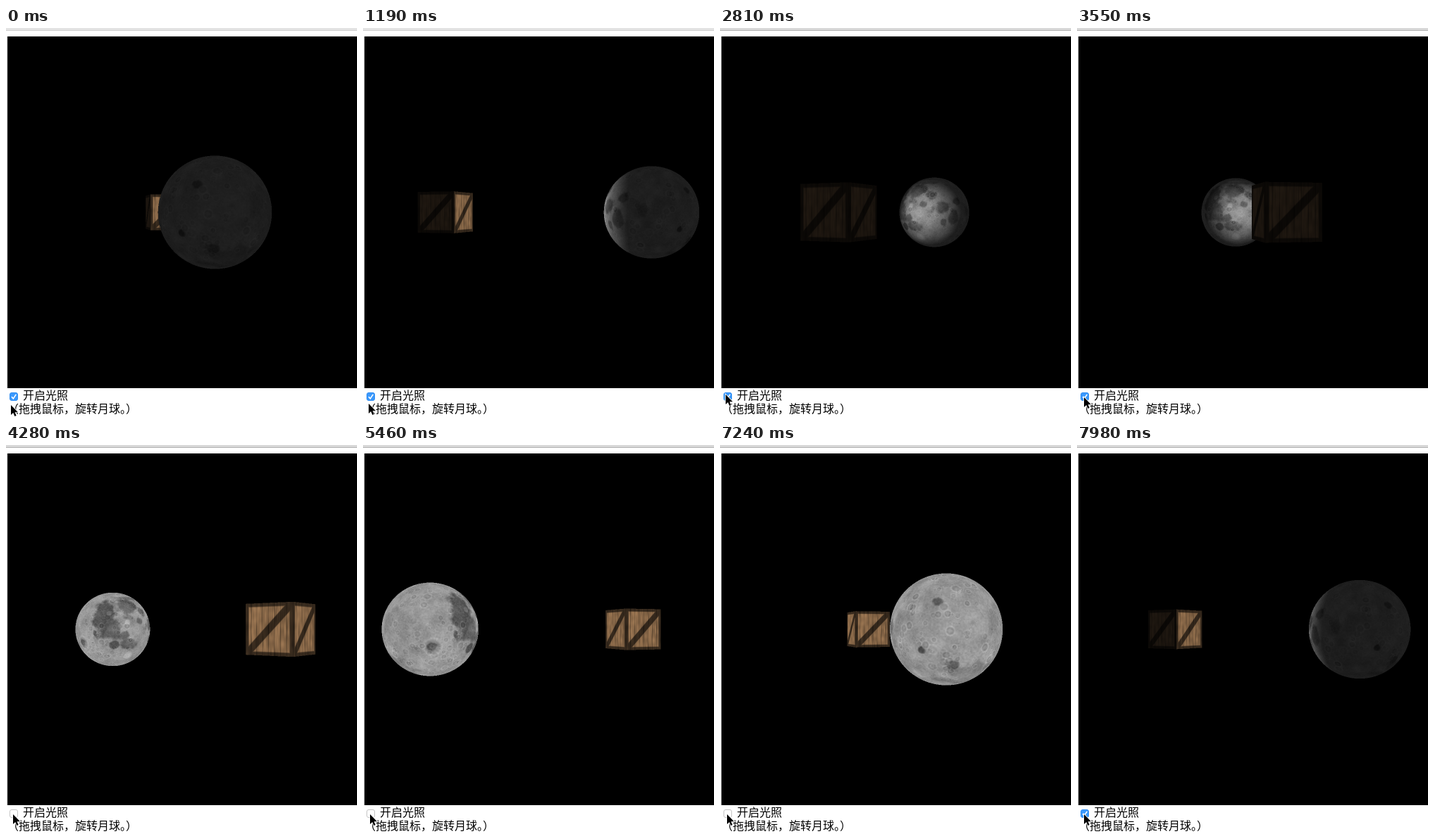
Write an HTML page with a canvas that moves like this. It is 498 by 553 pixels and loops after 8000 ms.

```html
<!DOCTYPE html>
<html lang="zh">
<head>
<meta charset="utf-8">
<style>
  html, body { margin: 0; width: 100%; height: 100%; overflow: hidden; background: #fff; }
  canvas { position: absolute; left: 2px; top: 12px; background: #000; }
  svg { position: absolute; left: 0; top: 0; }
  text { font: 16px "Noto Sans CJK SC", "Noto Sans CJK", sans-serif; }
</style>
</head>
<body>
<canvas id="scene" width="496" height="500"></canvas>
<svg width="498" height="553">
  <rect id="bar" width="498" height="3"/>
  <rect id="barLine" y="3" width="498" height="1"/>
  <rect id="box" x="5.5" y="518.5" width="11" height="11" rx="2.5"/>
  <path id="tick" d="M8 524.3l2.3 2.6 4-6" fill="none" stroke="#fff" stroke-width="1.6"/>
  <text x="24" y="528">开启光照</text>
  <text x="2" y="547">（拖拽鼠标，旋转月球。）</text>
  <path id="cursor" d="M0 0V14L3.2 11.1 5.4 16 7.7 15 5.6 10.2H10Z"
        stroke="#fff" stroke-width="1.6" paint-order="stroke"/>
</svg>
<script>
const LOOP = 8000, STEP = 147.5;
const RAD = Math.PI / 180;
const FOCAL = 250 / Math.tan(22.5 * RAD), CENTER = 250;
const CAMERA = 20, ORBIT = 5, MOON_R = 2;
const AMBIENT = 0.2, DIFFUSE = 0.8;
const LIGHT_OFF = 25, LIGHT_ON = 52, WINDOW_ACTIVE = 18;

const $ = id => document.getElementById(id);
const clamp = v => Math.min(1, Math.max(0, v));
const mix = (a, b, k) => a + (b - a) * k;
const smooth = (a, b, v) => { const k = clamp((v - a) / (b - a)); return k * k * (3 - 2 * k); };

let seed = 7;
const random = () => (seed = seed * 16807 % 2147483647) / 2147483647;

function hash(x, y, z) {
  const s = Math.sin(x * 12.9898 + y * 78.233 + z * 37.719) * 43758.5453;
  return s - Math.floor(s);
}

function noise(x, y, z) {
  const i = Math.floor(x), j = Math.floor(y), k = Math.floor(z);
  const fx = smooth(0, 1, x - i), fy = smooth(0, 1, y - j), fz = smooth(0, 1, z - k);
  const row = (b, c) => mix(hash(i, b, c), hash(i + 1, b, c), fx);
  const layer = c => mix(row(j, c), row(j + 1, c), fy);
  return mix(layer(k), layer(k + 1), fz);
}

function fbm(x, y, z) {
  let sum = 0, gain = 0.5;
  for (let n = 0; n < 4; n++, gain /= 2, x *= 2.1, y *= 2.1, z *= 2.1) sum += gain * noise(x, y, z);
  return sum / 0.9375;
}

// Lunar patches: longitude, latitude, half width, half height, darkness (negative is bright)
const PATCHES = [
  [-16, 33, 17, 15, .9], [17, 28, 10, 9, .9], [31, 9, 14, 11, 1], [59, 17, 8, 6, 1],
  [51, -8, 8, 11, .85], [35, -15, 5, 5, .8], [-16, -21, 11, 9, .8], [-39, -24, 6, 6, .95],
  [-57, 19, 14, 26, 1], [-40, 0, 15, 12, .9], [-24, -8, 10, 7, .8], [0, 56, 26, 4, .6],
  [4, 13, 6, 5, .7], [86, 6, 5, 9, .6], [-68, -5, 3, 4, 1], [-94, -20, 5, 5, .9],
  [147, 27, 5, 4, 1], [129, -20, 3.5, 3.5, 1.3], [163, -35, 6, 5, 1], [-170, -48, 25, 17, .35],
  [-11, -43, 7, 7, -.5], [-20, 10, 4, 4, -.55], [-47, 24, 3, 3, -.5], [61, -9, 3, 3, -.3]
];
const TEX_W = 720, TEX_H = 360;

function buildMoon() {
  const tex = new Float32Array(TEX_W * TEX_H);
  for (let r = 0; r < TEX_H; r++) {
    const lat = 90 - r / 2, cosLat = Math.cos(lat * RAD), y = Math.sin(lat * RAD);
    for (let c = 0; c < TEX_W; c++) {
      const lon = c / 2, x = Math.cos(lon * RAD) * cosLat, z = Math.sin(lon * RAD) * cosLat;
      const rough = fbm(x * 5 + 9, y * 5 + 9, z * 5 + 9);
      const grain = noise(x * 45, y * 45, z * 45);
      let dark = 0, bright = 0;
      for (const [pLon, pLat, w, h, depth] of PATCHES) {
        const dLat = (lat - pLat) / h;
        if (Math.abs(dLat) > 1.6) continue;
        const dLon = ((lon - pLon + 540) % 360 - 180) * cosLat / w;
        const cover = depth * smooth(1.25, 0.7, Math.hypot(dLon, dLat) + (rough - 0.5) * 1.5);
        dark = Math.max(dark, cover);
        bright = Math.max(bright, -cover);
      }
      tex[r * TEX_W + c] = 147 + (rough - 0.5) * 60 + (grain - 0.5) * 22 - dark * 55 + bright * 55;
    }
  }
  const crater = (lon, lat, radius, strength) => {
    const stretch = Math.max(0.1, Math.cos(lat * RAD)), reach = radius * 1.3;
    const r0 = Math.max(0, Math.ceil((90 - lat - reach) * 2));
    const r1 = Math.min(TEX_H - 1, (90 - lat + reach) * 2);
    for (let r = r0; r <= r1; r++)
      for (let c = Math.ceil((lon - reach / stretch) * 2); c <= (lon + reach / stretch) * 2; c++) {
        const d = Math.hypot((c / 2 - lon) * stretch, 90 - r / 2 - lat) / radius;
        const rim = Math.exp(-(((d - 1) / 0.17) ** 2)), floor = Math.exp(-(((d - 0.6) / 0.25) ** 2));
        tex[r * TEX_W + (c + TEX_W) % TEX_W] += strength * (rim - floor);
      }
  };
  for (let n = 0; n < 1100; n++)
    crater(random() * 360, Math.asin(random() * 2 - 1) / RAD, 0.8 + 4 * random() ** 4, 5 + random() * 13);
  crater(266, -20, 10, 18);
  return tex;
}
const moonTex = buildMoon();

function moonShade(lon, lat) {
  const c = lon * 2, r = Math.min(TEX_H - 2, (90 - lat) * 2);
  const i = Math.floor(c), j = Math.floor(r);
  const row = n => mix(moonTex[n * TEX_W + i % TEX_W], moonTex[n * TEX_W + (i + 1) % TEX_W], c - i);
  return mix(row(j), row(j + 1), r - j);
}

// Wooden crate face, u and v from 0 to 1 with v pointing up
function crateColor(u, v) {
  const plank = u * 8, gap = Math.abs(plank - Math.round(plank));
  const grain = noise(u * 45, v * 4, 3), worn = noise(u * 9, v * 9, 8);
  const edge = Math.min(u, v, 1 - u, 1 - v);
  let shade = 0.72 + grain * 0.32 + worn * 0.16 - 0.3 * smooth(0.12, 0, gap);
  const brace = Math.max(smooth(0.085, 0.055, edge), smooth(0.085, 0.06, Math.abs(u - v) * 0.707));
  shade *= mix(1, 0.4, brace);
  return [142 * shade, 108 * shade, 75 * shade];
}

// A ray expressed in the frame of a body orbiting at the given angle
function localRay(angle, dx, dy) {
  const c = Math.cos(angle), s = Math.sin(angle);
  return { ox: -CAMERA * s - ORBIT, oz: CAMERA * c, dx: dx * c + s, dy, dz: dx * s - c };
}

function traceMoon({ ox, oz, dx, dy, dz }, lit) {
  const a = dx * dx + dy * dy + dz * dz, b = ox * dx + oz * dz;
  const disc = b * b - a * (ox * ox + oz * oz - MOON_R * MOON_R);
  if (disc < 0) return null;
  const t = (-b - Math.sqrt(disc)) / a;
  const x = ox + dx * t, y = dy * t, z = oz + dz * t;
  let weight = 1;
  if (lit) {
    const lx = -ORBIT - x;
    const dot = (x * lx - y * y - z * z) / (MOON_R * Math.hypot(lx, y, z));
    weight = AMBIENT + DIFFUSE * Math.max(0, dot);
  }
  const lon = 180 - Math.atan2(z, x) / RAD, lat = Math.asin(y / MOON_R) / RAD;
  const g = moonShade(lon, lat) * weight;
  return { t, color: [g, g, g] };
}

function traceCrate({ ox, oz, dx, dy, dz }, lit) {
  const tx = (-Math.sign(dx) - ox) / dx, tz = (-Math.sign(dz) - oz) / dz;
  const t = Math.max(tx, tz);
  const x = ox + dx * t, y = dy * t, z = oz + dz * t;
  if (Math.max(Math.abs(x), Math.abs(y), Math.abs(z)) > 1.000001) return null;
  const onX = tx > tz, side = -Math.sign(onX ? dx : dz);
  const u = ((onX ? -z : x) * side + 1) / 2;
  const weight = !lit ? 1 : onX && side < 0 ? AMBIENT + DIFFUSE * 0.943 : AMBIENT;
  return { t, color: crateColor(u, (y + 1) / 2).map(v => v * weight) };
}

const ctx = $("scene").getContext("2d");
const TOP = 155, WIDTH = 496, HEIGHT = 190;
const SUBPIXELS = [0.25, 0.75];

function drawScene(angle, lit) {
  const image = ctx.createImageData(WIDTH, HEIGHT);
  const screenX = a => CENTER + FOCAL * ORBIT * Math.cos(a) / (CAMERA + ORBIT * Math.sin(a));
  const moonX = screenX(angle), crateX = screenX(angle + Math.PI);
  for (let py = 0; py < HEIGHT; py++)
    for (let px = 0; px < WIDTH; px++) {
      const i = (py * WIDTH + px) * 4;
      image.data[i + 3] = 255;
      const nearMoon = Math.abs(px - moonX) < 88, nearCrate = Math.abs(px - crateX) < 75;
      if (!nearMoon && !nearCrate) continue;
      const sum = [0, 0, 0];
      for (const sy of SUBPIXELS)
        for (const sx of SUBPIXELS) {
          const dx = (px + sx - CENTER) / FOCAL, dy = (CENTER - TOP - py - sy) / FOCAL;
          const moon = nearMoon && traceMoon(localRay(angle, dx, dy), lit);
          const crate = nearCrate && traceCrate(localRay(angle + Math.PI, dx, dy), lit);
          const hit = moon && crate ? (moon.t < crate.t ? moon : crate) : moon || crate;
          if (hit) hit.color.forEach((v, n) => sum[n] += v / 4);
        }
      image.data.set(sum, i);
    }
  ctx.putImageData(image, 0, TOP);
}

// Step, x, y of the pointer tip
const POINTER = [[0, 7, 536], [8, 8, 534], [12, 8, 533], [16, 8, 527], [18, 8, 521], [20, 8, 521], [24, 10, 525], [60, 10, 525]];

function pointerAt(step) {
  const n = POINTER.findIndex(key => key[0] > step);
  const [s0, x0, y0] = POINTER[n - 1], [s1, x1, y1] = POINTER[n];
  const k = (step - s0) / (s1 - s0);
  return [mix(x0, x1, k), mix(y0, y1, k)].map(Math.round);
}

function draw(step) {
  const lit = step < LIGHT_OFF || step >= LIGHT_ON, active = step >= WINDOW_ACTIVE;
  drawScene((-77.35 + 7.5 * step) * RAD, lit);
  $("bar").setAttribute("fill", active ? "#d9d9d9" : "#e4e4e4");
  $("barLine").setAttribute("fill", active ? "#b0b0b0" : "#cfcfcf");
  $("box").setAttribute("fill", lit ? "#3b99fc" : "#fff");
  $("box").setAttribute("stroke", lit ? "#2f8df2" : "#c4c4c4");
  $("tick").setAttribute("visibility", lit ? "visible" : "hidden");
  $("cursor").setAttribute("transform", `translate(${pointerAt(step)})`);
}

let shown = -1;
const start = performance.now();
function tick() {
  const time = (performance.now() - start) % LOOP;
  const step = Math.max(0, Math.floor((time - 2) / STEP));
  if (step !== shown) draw(shown = step);
  requestAnimationFrame(tick);
}
tick();
</script>
</body>
</html>
```
